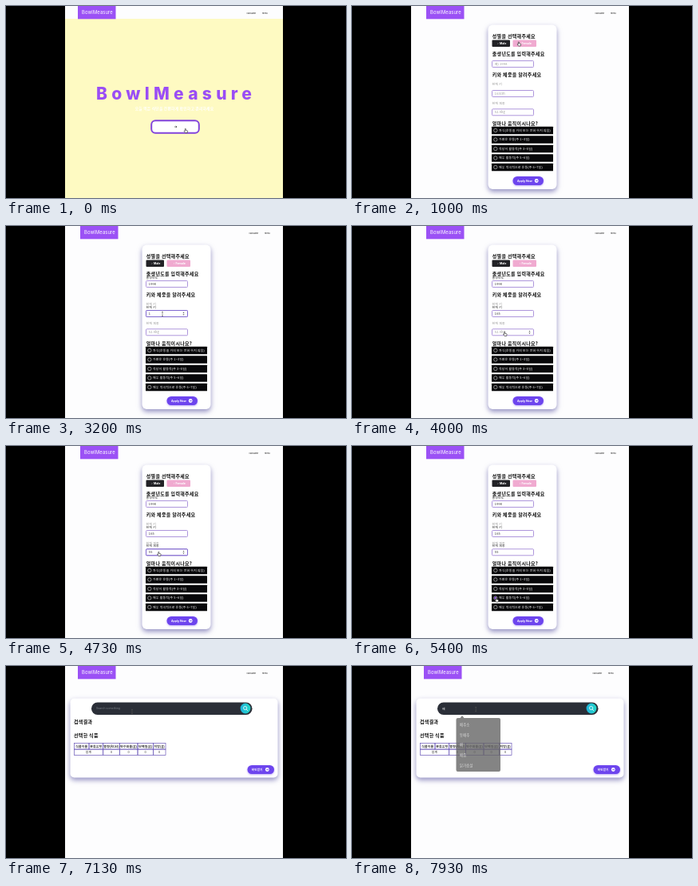
Write an HTML page that moves like this. It is 426 px wide and 240 px high and loops after 8 s.

```html
<!DOCTYPE html>
<html>
<head>
<meta charset="utf-8">
<title>BowlMeasure</title>
<style>
html, body { margin: 0; width: 100%; height: 100%; overflow: hidden; background: #000; }
svg { display: block; width: 100vw; height: 100vh; }
text { font-family: "Noto Sans CJK KR", "Noto Sans CJK", "Noto Sans CJK JP", sans-serif; font-size: 3.9px; letter-spacing: .2px; fill: #333; }
.latin { font-family: Inter, sans-serif; letter-spacing: 0; }
.title { font-size: 21px; font-weight: 800; letter-spacing: 5.3px; fill: #9a4df5; }
.logo { font-size: 5.8px; letter-spacing: .15px; fill: #fff; }
.nav { font-size: 2.5px; font-weight: 500; }
.head { font-size: 6px; letter-spacing: .3px; font-weight: 700; fill: #111; }
.hint { fill: #999; }
.light { fill: #fff; }
.mid { text-anchor: middle; }
.bold { font-weight: 700; }
.small { font-size: 3.5px; }
.card { fill: #fff; filter: drop-shadow(0 3px 3px #5550a0a0); }
.field { fill: #fff; stroke: #a58bd8; stroke-width: .9; }
.focus { fill: none; stroke: #8068d0; stroke-width: 1; }
.line { fill: none; stroke: #6a58b8; stroke-width: .7; }
.pill { fill: #6d45ee; filter: drop-shadow(0 1px 1px #6d45ee70); }
</style>
</head>
<body>
<svg viewBox="0 0 426 240">
  <defs>
    <linearGradient id="teal"><stop stop-color="#20b4dc"/><stop offset="1" stop-color="#25d8c8"/></linearGradient>
    <clipPath id="page"><rect x="74" width="273" height="240"/></clipPath>
  </defs>
  <rect width="426" height="240"/>
  <g clip-path="url(#page)">
    <rect x="74" width="274" height="240" fill="#fdfdfe"/>

    <g data-show="0 500">
      <rect x="74" y="16" width="274" height="224" fill="#fefac2"/>
      <text class="latin title" x="113" y="117">BowlMeasure</text>
      <text class="light mid bold" x="211" y="130.3" style="font-size:4.8px">오늘 먹은 식단을 간편하게 확인하고 관리하세요</text>
      <rect x="182.2" y="143.2" width="59.6" height="15.6" rx="5" fill="#fff" stroke="#8244dc" stroke-width="2"/>
      <path d="M211 151h3m-1.2-1.2 1.2 1.2-1.2 1.2" fill="none" stroke="#222" stroke-width=".6"/>
    </g>

    <g data-show="500 6500">
      <rect class="card" x="170.5" y="23.5" width="86" height="205.5" rx="6"/>
      <g id="form"></g>
      <rect x="175.5" y="42.5" width="22.5" height="8.5" rx="1" fill="#222226"/>
      <text class="latin light bold mid small" x="187.5" y="48.1">♂ Male</text>
      <rect x="201.5" y="42.5" width="29.5" height="8.5" rx="1" fill="#f0aad0"/>
      <text class="latin light bold mid small" x="217" y="48.1">♀ Female</text>
      <rect class="pill" x="201.5" y="213" width="38.5" height="11" rx="5.5"/>
      <text class="latin light bold small" x="207" y="219.8">Apply Now</text>
      <circle cx="231.2" cy="218.5" r="2.4" fill="#fff"/>
      <path d="M229.8 218.5h2.6m-1-1 1 1-1 1" fill="none" stroke="#6d45ee" stroke-width=".6"/>
    </g>

    <g data-show="6500 8000">
      <rect class="card" x="80.5" y="40.5" width="260" height="99" rx="5"/>
      <rect x="107" y="45.5" width="201.5" height="15.5" rx="7.7" fill="#2b2f38"/>
      <circle cx="300" cy="53" r="6.4" fill="url(#teal)"/>
      <circle cx="299.6" cy="52.5" r="2.1" fill="none" stroke="#fff" stroke-width=".8"/>
      <path d="M301.2 54.1 303 56" stroke="#fff" stroke-width=".8"/>
      <text class="latin small" x="113" y="54.3" style="fill:#777d84" data-show="6500 7730">Search something</text>
      <text class="light" x="113" y="54.8" data-show="7730 8000">배</text>
      <text class="head" x="85" y="72.3">검색결과</text>
      <text class="head" x="85" y="89.2">선택한 식품</text>
      <g id="table"></g>
      <rect class="pill" x="302.5" y="124" width="33.5" height="11" rx="5.5"/>
      <text class="light bold small" x="307.8" y="130.9">확인받기</text>
      <circle cx="327.3" cy="129.5" r="2.4" fill="#fff"/>
      <path d="M326 129.5h2.5m-1-1 1 1-1 1" fill="none" stroke="#6d45ee" stroke-width=".6"/>
      <g id="menu" data-show="7800 8000">
        <path d="M132.5 65h3l2.5-3 2.5 3h43.5q2 0 2 2v63q0 2-2 2h-51.5q-2 0-2-2v-63q0-2 2-2" fill="#666" fill-opacity=".8"/>
      </g>
    </g>

    <g id="header">
      <rect x="71" width="280" height="16" fill="#fdfdfe"/>
      <rect x="90" width="47.5" height="16.3" fill="#9b51f5"/>
      <text class="latin logo" x="95" y="10.2">BowlMeasure</text>
      <text class="latin nav" x="301.5" y="9.6">calculator</text>
      <text class="latin nav" x="321" y="9.6">menu</text>
    </g>

    <g id="pointer">
      <path id="hand" d="M-.7-2q.7-.6 1 0v1.8l1.9.5q.6.2.4.8l-.5 1.9h-2.5l-1.6-2.1q.3-.7 1.3 0z" fill="#fff" stroke="#222" stroke-width=".6"/>
      <path id="beam" d="M-1-2.6h2m-1 0v5.2m-1 0h2" fill="none" stroke="#555" stroke-width=".6"/>
    </g>
  </g>
</svg>
<script>
const LOOP = 8000, STEP = 1000 / 15;
const $ = id => document.getElementById(id);

function add(parent, tag, attrs, label = '') {
  const node = document.createElementNS('http://www.w3.org/2000/svg', tag);
  const { show, ...rest } = attrs;
  for (const key in rest) node.setAttribute(key, rest[key]);
  if (show) node.dataset.show = show.join(' ');
  node.textContent = label;
  parent.append(node);
}

const form = $('form');
[['성별을 선택해주세요', 39.6], ['출생년도를 입력해주세요', 62],
 ['키와 체중을 알려주세요', 88.2], ['얼마나 움직이시나요?', 148.6]]
  .forEach(([label, y]) => add(form, 'text', { class: 'head', x: 175.8, y }, label));

// Each field takes focus, then gets its value one key at a time.
[{ y: 68.5, label: '출생년도', hint: '예) 1998', value: '1998', focus: 1800, type: 2000, blur: 2850 },
 { y: 105.5, label: '현재 키', hint: '163cm', value: '165', focus: 2850, type: 3200, blur: 3850, caption: 99.4 },
 { y: 128.8, label: '현재 체중', hint: '52.9kg', value: '55', focus: 4250, type: 4500, blur: 5100, caption: 123 }]
.forEach(({ y, label, hint, value, focus, type, blur, caption }) => {
  const box = { x: 175.5, y, width: 52, height: 8, rx: 1 };
  add(form, 'rect', { class: 'field', ...box });
  add(form, 'rect', { class: 'focus', ...box, show: [focus, blur] });
  if (caption) add(form, 'text', { class: 'hint', x: 175.5, y: caption }, label);
  add(form, 'text', { x: 175.5, y: y - 2.5, show: [focus, 6500] }, label);
  add(form, 'text', { class: 'hint', x: 178.8, y: y + 5.5, show: [0, type] }, hint);
  [...value].forEach((_, i) => {
    const last = i === value.length - 1;
    add(form, 'text', { x: 178.8, y: y + 5.5, show: [type + i * 120, last ? 6500 : type + (i + 1) * 120] }, value.slice(0, i + 1));
  });
  add(form, 'path', { d: `M221.5 ${y + 3.4}l1-1.5 1 1.5zm0 1.4l1 1.5 1-1.5z`, fill: '#555', show: [focus - 300, blur - 350] });
});

['좌식(운동을 거의 또는 전혀 하지 않음)', '가벼운 운동(주 1~3일)', '적당히 활동적(주 3~5일)',
 '매우 활동적(주 5~6일)', '매우 적극적으로 운동(주 6~7일)'].forEach((label, i) => {
  const y = 155.5 + i * 11.5;
  add(form, 'rect', { x: 175, y: y - 4.8, width: 77, height: 9.6, rx: .6, fill: '#08080a' });
  add(form, 'circle', { cx: 179.8, cy: y, r: 2.2, fill: 'none', stroke: '#ddd', 'stroke-width': .6 });
  if (i === 3) add(form, 'circle', { cx: 179.8, cy: y, r: 1.4, fill: '#a060ff', show: [5350, 6500] });
  add(form, 'text', { class: 'light', x: 184, y: y + 1.4, 'font-weight': 500 }, label);
});

const edges = [85.5, 104, 121.7, 142.5, 165, 184.5, 200];
['식품이름', '분류유형', '열량(kcal)', '탄수화물(g)', '단백질(g)', '지방(g)'].forEach((label, i) => {
  const x = edges[i], width = edges[i + 1] - x, mid = x + width / 2;
  add($('table'), 'rect', { class: 'line', x, y: 96.5, width, height: 7.6 });
  add($('table'), 'text', { class: 'mid bold', x: mid, y: 101.7 }, label);
  if (i < 2) return;
  add($('table'), 'rect', { class: 'line', x, y: 104.1, width, height: 7.4 });
  add($('table'), 'text', { class: 'mid', x: mid, y: 109.2 }, '0');
});
add($('table'), 'rect', { class: 'line', x: 85.5, y: 104.1, width: 36.2, height: 7.4 });
add($('table'), 'text', { class: 'mid', x: 103.5, y: 109.2 }, '합계');

['배추소', '동배추', '배', '배즙', '닭가슴살'].forEach((label, i) =>
  add($('menu'), 'text', { x: 135, y: 74.8 + i * 12.7, style: 'fill:#ddd;font-size:4.3px' }, label));

// Pointer stops: time, x, y
const stops = [[0, 225, 155.5], [550, 225, 155.5], [950, 209, 47], [1300, 209, 47], [1750, 198, 73],
  [2550, 198, 73], [2800, 196, 110], [3650, 196, 110], [3950, 191.5, 134.5], [4900, 191.5, 134.5],
  [5350, 181, 192], [5650, 181, 192], [6050, 221, 219], [6550, 221, 219], [7000, 158, 57], [8000, 155, 54]];
const ease = p => p * p * (3 - 2 * p);

function pointerAt(t) {
  const i = stops.findIndex(stop => stop[0] > t);
  const [t0, x0, y0] = stops[i - 1], [t1, x1, y1] = stops[i];
  const p = ease((t - t0) / (t1 - t0));
  return [x0 + (x1 - x0) * p, y0 + (y1 - y0) * p];
}

const timed = [...document.querySelectorAll('[data-show]')].map(node => ({
  node, span: node.dataset.show.split(' ').map(Number)
}));

function draw() {
  const now = performance.now() % LOOP;
  const t = Math.floor(now / STEP) * STEP;
  for (const { node, span: [from, to] } of timed)
    node.style.display = t >= from && t < to ? '' : 'none';
  const [x, y] = pointerAt(t);
  const typing = (t > 1650 && t < 3850) || t > 6900;
  $('pointer').setAttribute('transform', `translate(${x} ${y})`);
  $('hand').style.display = typing ? 'none' : '';
  $('beam').style.display = typing ? '' : 'none';
  $('header').setAttribute('transform', `translate(${t >= 500 && t < 6500 ? 3 : 0} 0)`);
  requestAnimationFrame(draw);
}
draw();
</script>
</body>
</html>
```
